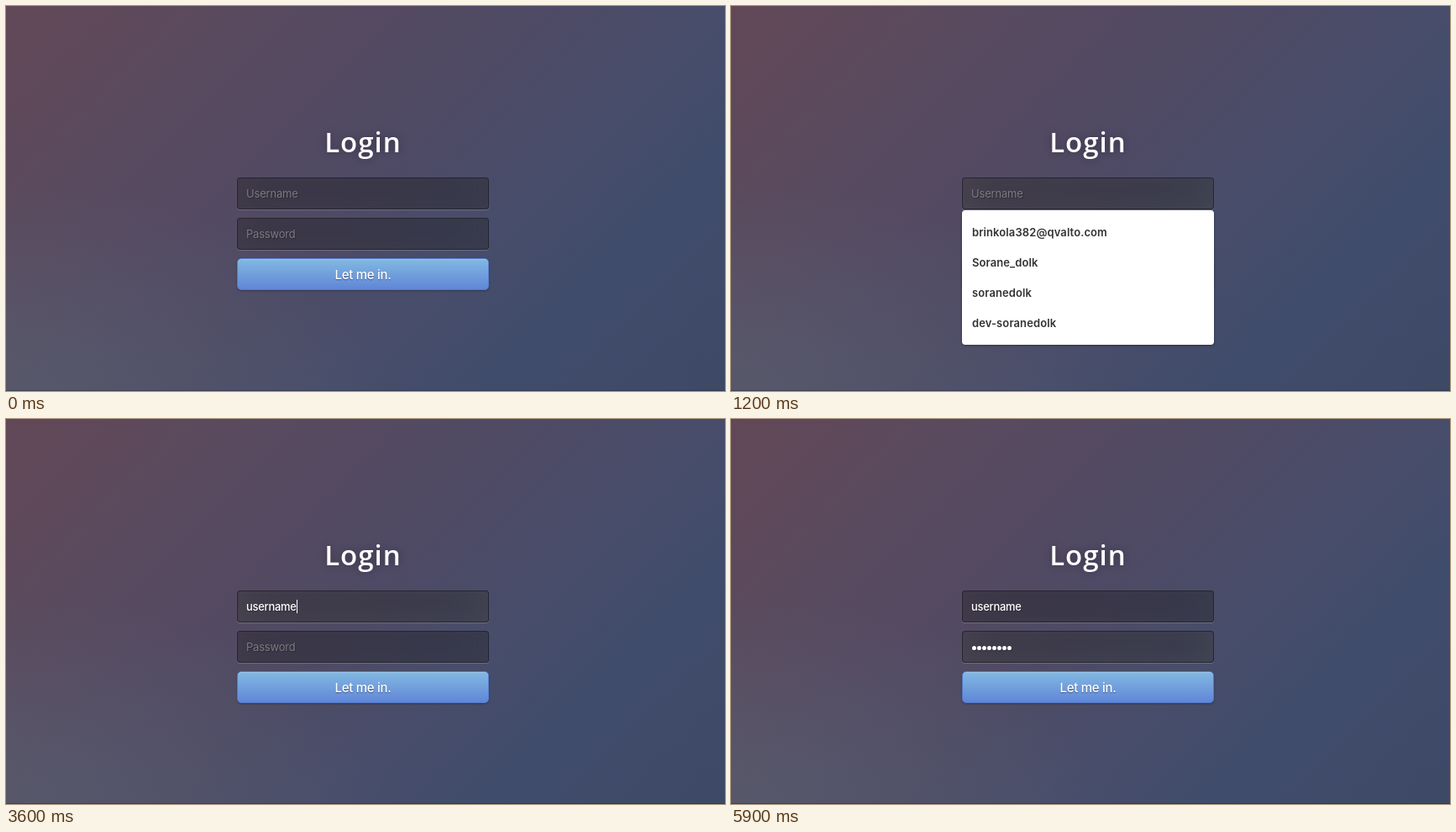
These frames come from a looping animation (856x458 px, 6.2 s). An HTML page:

```html
<!DOCTYPE html>
<html lang="en">
<head>
<meta charset="utf-8">
<title>Login</title>
<style>
  html, body { margin: 0; width: 100%; height: 100%; overflow: hidden; }
  body {
    position: relative;
    font-family: Inter, "Liberation Sans", sans-serif;
    background:
      radial-gradient(ellipse farthest-corner at 0% 100%, rgba(92, 106, 118, .4) 5%, rgba(92, 106, 118, 0) 38%),
      linear-gradient(135deg, #624857 0%, #574a60 28%, #4e4a65 50%, #484d6a 63%, #404c6b 78%, #3d4965 100%);
  }
  body::after {
    content: "";
    position: absolute;
    inset: 0;
    border-bottom: 1px solid rgba(25, 25, 45, .35);
  }
  h1, .field, .button, .menu { position: absolute; box-sizing: border-box; margin: 0; white-space: pre; }
  h1 {
    left: 275px; top: 142px; width: 300px; height: 40px;
    font: 600 33px/40px "Open Sans", "Noto Sans", sans-serif;
    letter-spacing: 1px;
    text-align: center;
    color: #fff;
    text-shadow: 0 0 10px rgba(0, 0, 0, .3);
  }
  .field {
    --focus: 0;
    left: 275px; width: 300px; height: 38px;
    padding-left: 10px;
    display: flex;
    align-items: center;
    border: 1px solid rgba(0, 0, 0, .3);
    border-radius: 4px;
    background: rgba(0, 0, 0, .3);
    box-shadow:
      inset 0 -5px 45px rgba(100, 100, 100, calc(.2 + .2 * var(--focus))),
      0 1px 1px rgba(255, 255, 255, .2);
    font-size: 13px;
    color: #fff;
    text-shadow: 1px 1px 1px rgba(0, 0, 0, .3);
  }
  #user { top: 204px; }
  #pass { top: 252px; }
  .value { font-weight: 500; letter-spacing: -.3px; }
  .hint { color: #7c7981; letter-spacing: -.2px; }
  .caret { width: 1px; height: 16px; margin-right: -1px; background: #fff; }
  .dot {
    display: inline-block;
    width: 5px; height: 5px;
    margin: 0 0 0 .95px;
    border-radius: 50%;
    background: #fff;
    vertical-align: middle;
    box-shadow: 1px 1px 1px rgba(0, 0, 0, .3);
  }
  .button {
    left: 275px; top: 300px; width: 300px; height: 38px;
    border: 1px solid #5579c6;
    border-radius: 5px;
    background: linear-gradient(#82b9e2, #6086d7);
    box-shadow: inset 0 1px 0 rgba(255, 255, 255, .2), 0 1px 2px rgba(0, 0, 0, .3);
    font-size: 15px;
    font-weight: 500;
    line-height: 37px;
    letter-spacing: -.3px;
    text-align: center;
    color: #fff;
    text-shadow: 0 1px 1px rgba(0, 0, 0, .4);
  }
  .menu {
    left: 275px; top: 243px; width: 300px; height: 160px;
    padding: 8px 12px;
    border-radius: 4px;
    background: #fff;
    box-shadow: 0 1px 3px rgba(0, 0, 0, .35);
    font-size: 13px;
    font-weight: 600;
    line-height: 36px;
    letter-spacing: .1px;
    color: #333;
  }
  [hidden] { display: none; }
</style>
</head>
<body>
<h1>Login</h1>
<div class="field" id="user"><span class="value"></span><i class="caret"></i><span class="hint">Username</span></div>
<div class="field" id="pass"><span class="value"></span><i class="caret"></i><span class="hint">Password</span></div>
<div class="button">Let me in.</div>
<div class="menu" id="menu"><div>brinkola382@qvalto.com</div><div>Sorane_dolk</div><div>soranedolk</div><div>dev-soranedolk</div></div>
<script>
  const LOOP = 6200;
  const FADE = 400;
  const MENU = [800, 1600];

  const parts = id => {
    const box = document.getElementById(id);
    const [value, caret, hint] = box.children;
    return { box, value, caret, hint };
  };

  // keys: time of each keystroke; carets: spans in which the caret shows
  const fields = [
    {
      ...parts("user"),
      keys: [1600, 1700, 1800, 2000, 2100, 2200, 2300, 2600],
      carets: [[800, 1200], [1600, 3100], [3600, 3700]],
      focus: [800, 3700],
      fadeIn: 1,
      show: n => "username".slice(0, n)
    },
    {
      ...parts("pass"),
      keys: [4400, 4500, 4600, 4700, 4900, 5000, 5100, 5300],
      carets: [[3700, 4200], [4400, 5700]],
      focus: [3700, LOOP + FADE],
      fadeIn: FADE,
      show: n => '<i class="dot"></i>'.repeat(n)
    }
  ];
  const menu = document.getElementById("menu");

  const within = (t, [from, to]) => t >= from && t < to;
  const ramp = (t, start, length) => Math.min(1, Math.max(0, (t - start) / length));

  function drawField(f, t) {
    const count = f.keys.filter(k => t >= k).length;
    if (f.count !== count) {
      f.count = count;
      f.value.innerHTML = f.show(count);
    }
    f.hint.hidden = count > 0;
    f.caret.hidden = !f.carets.some(span => within(t, span));
    const focus = ramp(t, f.focus[0], f.fadeIn) - ramp(t, f.focus[1], FADE);
    f.box.style.setProperty("--focus", focus.toFixed(3));
  }

  function draw(now) {
    const t = now % LOOP;
    fields.forEach(f => drawField(f, t));
    menu.hidden = !within(t, MENU);
  }

  const start = performance.now();
  function tick() {
    draw(performance.now() - start);
    requestAnimationFrame(tick);
  }
  tick();
</script>
</body>
</html>
```
